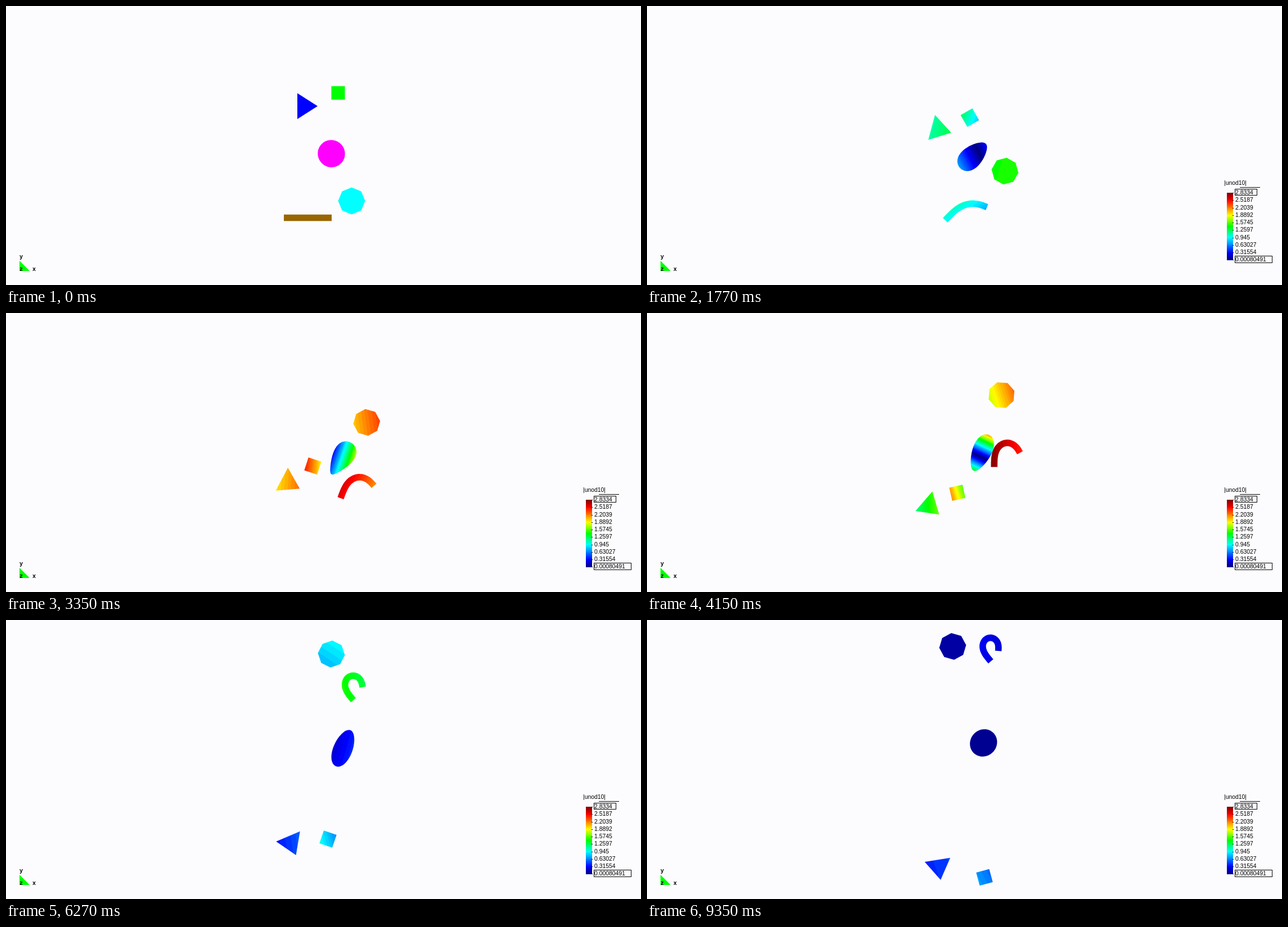
An HTML page with a canvas that plays this animation: 1129x496 px, repeating every 9390 ms.

```html
<!DOCTYPE html>
<html>
<head>
<meta charset="utf-8">
<title>Bodies moving in a flow</title>
<style>
html, body { margin: 0; width: 100%; height: 100%; overflow: hidden; background: #fcfcfe; }
canvas { display: block; }
</style>
</head>
<body>
<canvas id="stage" width="1129" height="496"></canvas>
<script>
const ctx = document.getElementById('stage').getContext('2d');
const LOOP = 9390, RAD = Math.PI / 180;
const PX_PER_SPEED = 0.0295; // px per ms for one unit on the legend
const MIN = 0.00080491, MAX = 2.8334;
const TIMES = [0, 1770, 3350, 5000, 6270, 7730, 9350], LAST = TIMES.length - 1;

// Key points along each path: speed, x, y, turn in degrees, then what the shape needs.
const BODIES = [
  { plain: '#00f', trace: triangle, keys: [
    [.5, 530, 178, 0], [1.17, 517.7, 219, 15], [2.1, 501, 301, 28], [.8, 504.3, 370.3, 55],
    [.46, 506.2, 395.8, 67], [.42, 511.2, 417, 76], [.43, 518.3, 438.3, 81]] },
  { plain: '#0f0', trace: turn => polygon(4, 17, turn + 45), keys: [
    [.75, 590.5, 154.5, 0], [1.03, 574, 198.5, -30], [2.2, 545.5, 272, -72], [1, 564, 355, -135],
    [.82, 572.5, 389.5, -161], [.77, 583.3, 424.5, -182], [.64, 600, 457.5, -195]] },
  // Shape: long radius, tilt, egg factor
  { plain: '#f0f', trace: egg, keys: [
    [.05, 578.5, 262.5, 0, 24, -40, 0], [.2, 579.5, 266.5, -20, 31.5, -43, -.25],
    [.95, 596.5, 259, -95, 33, -57, .45], [.48, 588.5, 243, -220, 36, -75, -.1],
    [.3, 599.5, 228, -245, 34.5, -68, -.08], [.1, 600.5, 220, -248, 28.6, -62, 0],
    [.03, 598.3, 218.5, -248, 25, -48, 0]] },
  { plain: '#0ff', trace: turn => polygon(8, 24, turn), keys: [
    [.8, 614.5, 346.5, 0], [1.45, 636.5, 293.5, 7], [2.2, 641.3, 194.5, -6], [1.77, 611, 102.5, -32],
    [.86, 578.5, 60.5, -41], [.36, 553.2, 49.5, -50], [.08, 543.5, 47, -51]] },
  // Turn is the heading of the right end; shape: heading of the left end
  { plain: '#960', trace: rod, width: 11.6, keys: [
    [.3, 536.5, 376.5, 0, 0], [.95, 565, 360, 22, -46], [2.45, 620.8, 303.7, 50, -70],
    [2.12, 630.4, 182.6, 70, -111], [1.38, 615.3, 115.2, 80, -130], [.68, 606.7, 68.4, 88, -132],
    [.25, 609.3, 47.6, 95, -130]] }];

// Velocity at a key: its speed, along the circle through the neighbouring keys
function velocity(keys, i) {
  let vx = 0, vy = 0;
  const chord = a => {
    const dx = keys[a + 1][1] - keys[a][1], dy = keys[a + 1][2] - keys[a][2];
    return [dx, dy, dx * dx + dy * dy];
  };
  for (const a of [i - 1, i]) {
    if (a < 0 || a >= LAST) continue;
    const [dx, dy, sq] = chord(a);
    vx += dx / sq;
    vy += dy / sq;
  }
  const k = keys[i][0] * PX_PER_SPEED / Math.hypot(vx, vy);
  return [vx * k, vy * k];
}

function slope(keys, i, c) {
  if (c === 1 || c === 2) return velocity(keys, i)[c - 1];
  const a = Math.max(i - 1, 0), b = Math.min(i + 1, LAST);
  return (keys[b][c] - keys[a][c]) / (TIMES[b] - TIMES[a]);
}

function sample(keys, t) {
  let i = 0;
  while (i < LAST - 1 && t >= TIMES[i + 1]) i++;
  const span = TIMES[i + 1] - TIMES[i], u = (t - TIMES[i]) / span, w = 1 - u;
  return keys[i].map((a, c) =>
    a * w * w * (1 + 2 * u) + keys[i + 1][c] * u * u * (3 - 2 * u) +
    span * u * w * (slope(keys, i, c) * w - slope(keys, i + 1, c) * u));
}

// Navy, blue, cyan, green, yellow, red, dark red
function colour(speed) {
  const n = 9 * Math.min(Math.round(Math.abs(speed) / MAX * 64) / 64, 1);
  const ramp = (from, to) => Math.min(Math.max((n - from) / (to - from), 0), 1);
  const rgb = [
    ramp(4.5, 6) - ramp(8, 9) / 2,
    ramp(1, 3) - ramp(6, 8),
    (1 + ramp(0, 1)) / 2 - ramp(3, 4.5)];
  return `rgb(${rgb.map(v => Math.round(v * 255))})`;
}

// Speed across a turning body: faster on the side that turns with the motion
function paint(pose, before) {
  const dx = pose[1] - before[1], dy = pose[2] - before[2], step = Math.hypot(dx, dy);
  const speed = step / PX_PER_SPEED, spin = (pose[3] - before[3]) * RAD / PX_PER_SPEED;
  if (!step) return colour(0);
  const R = 45, x = R * dy / step, y = -R * dx / step;
  const g = ctx.createLinearGradient(-x, -y, x, y);
  for (let i = 0; i <= 2 * R; i++) g.addColorStop(i / (2 * R), colour(speed + spin * (i - R)));
  return g;
}

function triangle(turn) {
  ctx.rotate(turn * RAD);
  ctx.moveTo(24, 0);
  ctx.lineTo(-12, 23);
  ctx.lineTo(-12, -23);
  ctx.rotate(-turn * RAD);
}

function polygon(n, r, angle) {
  for (let i = 0; i < n; i++) {
    const a = angle * RAD + i * 2 * Math.PI / n;
    ctx.lineTo(r * Math.cos(a), r * Math.sin(a));
  }
}

// The area stays the same while it stretches
function egg(turn, long, tilt, skew) {
  ctx.rotate(tilt * RAD);
  for (let q = 0; q < 2 * Math.PI; q += .08) {
    ctx.lineTo(long * Math.cos(q), 585 / long * Math.sin(q) * (1 + skew * Math.cos(q)));
  }
  ctx.rotate(-tilt * RAD);
}

// Fixed length; the heading eases from one end to the other
function rod(end, start) {
  const N = 40, pts = [];
  let x = 0, y = 0, mx = 0, my = 0;
  for (let i = 0; i <= N; i++) {
    pts.push([x, y]);
    mx += x / (N + 1);
    my += y / (N + 1);
    const u = ((i + .5) / N) ** 1.3;
    const a = (start + (end - start) * u * u * (3 - 2 * u)) * RAD;
    x += 85 / N * Math.cos(a);
    y += 85 / N * Math.sin(a);
  }
  pts.forEach(p => ctx.lineTo(p[0] - mx, p[1] - my));
}

function drawBody({ keys, plain, trace, width }, t) {
  const pose = sample(keys, t);
  ctx.save();
  ctx.translate(pose[1], pose[2]);
  ctx.beginPath();
  trace(...pose.slice(3));
  ctx.fillStyle = ctx.strokeStyle = t < 40 ? plain : paint(pose, sample(keys, t - 1));
  if (width) {
    ctx.lineWidth = width;
    ctx.stroke();
  } else {
    ctx.fill();
  }
  ctx.restore();
}

function drawAxes() {
  ctx.fillStyle = '#0f0';
  ctx.beginPath();
  ctx.moveTo(24, 453);
  ctx.lineTo(42, 471);
  ctx.lineTo(24, 471);
  ctx.fill();
  ctx.fillStyle = '#000';
  ctx.font = 'bold 10px "Liberation Mono", monospace';
  ctx.fillText('y', 24, 449);
  ctx.fillText('z', 24, 471);
  ctx.fillText('x', 47, 471);
}

function drawLegend() {
  for (let y = 0; y < 120; y++) {
    ctx.fillStyle = colour(MAX * (1 - y / 119));
    ctx.fillRect(1031, 332 + y, 11, 1);
  }
  ctx.fillStyle = ctx.strokeStyle = '#000';
  ctx.lineWidth = 1;
  ctx.font = '10.4px "Liberation Sans", Arial, sans-serif';
  ctx.fillText('|unod10|', 1026, 318);
  ctx.fillRect(1054, 322, 36, 1);
  for (let i = 0; i < 10; i++) {
    const y = 335 + i * 13.25, value = MAX - (MAX - MIN) * i / 9;
    ctx.fillText(Number(value.toPrecision(5)), 1046, Math.round(y));
    ctx.fillRect(1041, Math.round(y - 3), 2, 1);
  }
  ctx.strokeRect(1045.5, 325.5, 39, 11);
  ctx.strokeRect(1045.5, 444.5, 66, 12);
}

function frame(t) {
  ctx.fillStyle = '#fcfcfe';
  ctx.fillRect(0, 0, 1129, 496);
  BODIES.forEach(body => drawBody(body, Math.min(t, TIMES[LAST])));
  drawAxes();
  if (t >= 40) drawLegend();
}

let start;
function tick(now) {
  start ??= now;
  frame((now - start) % LOOP);
  requestAnimationFrame(tick);
}
requestAnimationFrame(tick);
</script>
</body>
</html>
```
